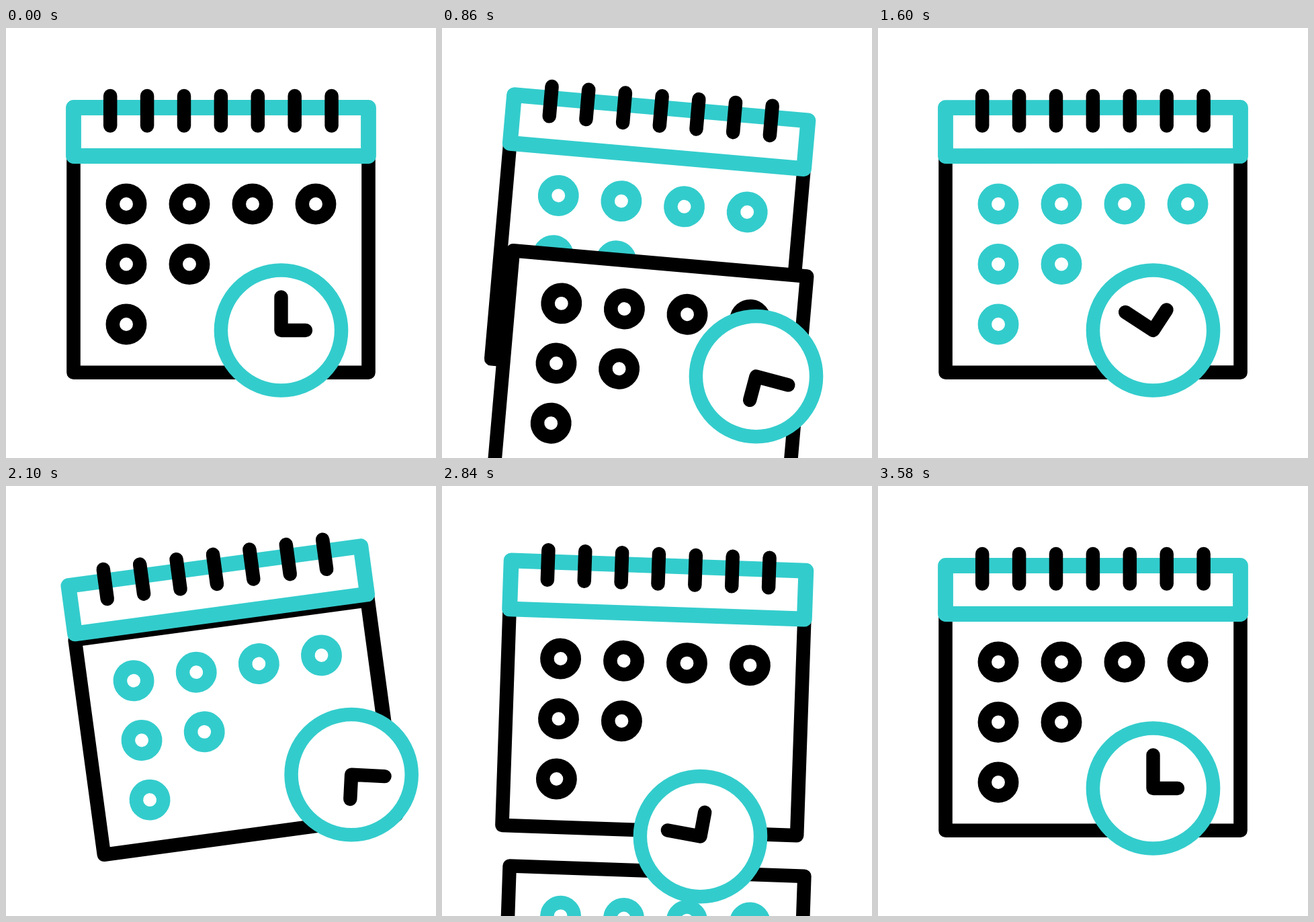
Write an HTML page with a canvas that moves like this. It is 640 by 640 pixels and loops after 3.6 s.

```html
<!DOCTYPE html>
<html lang="en">
<head>
<meta charset="utf-8">
<title>Calendar and clock</title>
<style>
  html, body { margin: 0; width: 100%; height: 100%; overflow: hidden; background: #fff; }
  canvas { display: block; width: 640px; height: 640px; }
</style>
</head>
<body>
<canvas id="stage" width="640" height="640"></canvas>
<script>
const ctx = document.getElementById('stage').getContext('2d');
const TEAL = '#33cccc', BLACK = '#000', WHITE = '#fff';
const LOOP = 3600, CYCLE = 1594, SPIN = 3580;
const PIVOT = { x: 320, y: 190 };
const DEG = Math.PI / 180;
const DOTS_PER_ROW = [4, 2, 1];

// Progress of the clock around its circular path: time, degrees, degrees per ms.
const ORBIT = [
  [0, 0, 0], [420, 53, 0.29], [507, 82, 0.3], [860, 141, 0.1],
  [1080, 168, 0.4], [1246, 278, 0.6], [1560, 360, 0]
];

const clamp = v => Math.min(1, Math.max(0, v));
const ramp = (t, from, to) => clamp((t - from) / (to - from));
const ease = (t, from, to) => {
  const u = ramp(t, from, to);
  return u * u * (3 - 2 * u);
};

function hermite(keys, t) {
  for (let i = 1; i < keys.length; i++) {
    const [t0, a, va] = keys[i - 1], [t1, b, vb] = keys[i];
    if (t > t1) continue;
    const d = t1 - t0, u = (t - t0) / d, w = 1 - u;
    return w * w * ((1 + 2 * u) * a + u * d * va) + u * u * ((1 + 2 * w) * b - w * d * vb);
  }
  return keys[keys.length - 1][1];
}

const swing = t =>
  -10 * ease(t, 0, 395) + 15 * ease(t, 395, 848) - 5 * ease(t, 848, 1550);

function stroke(color, width) {
  ctx.strokeStyle = color;
  ctx.lineWidth = width;
  ctx.stroke();
}

function ring(x, y, radius, color) {
  ctx.beginPath();
  ctx.arc(x, y, radius, 0, 2 * Math.PI);
  ctx.fillStyle = WHITE;
  ctx.fill();
  stroke(color, 20.5);
}

function box(top, height, color, width) {
  ctx.beginPath();
  ctx.rect(100.5, top, 439, height);
  ctx.fillStyle = WHITE;
  ctx.fill();
  stroke(color, width);
}

function rotated(angle, draw) {
  ctx.save();
  ctx.translate(PIVOT.x, PIVOT.y);
  ctx.rotate(angle * DEG);
  ctx.translate(-PIVOT.x, -PIVOT.y);
  draw();
  ctx.restore();
}

function sheet(angle, dotColor, dx = 0, dy = 0) {
  ctx.save();
  ctx.translate(dx, dy);
  rotated(angle, () => {
    box(190, 322.7, BLACK, 20.6);
    DOTS_PER_ROW.forEach((count, row) => {
      for (let i = 0; i < count; i++) ring(179 + 94 * i, 262 + 89.5 * row, 20.2, dotColor);
    });
  });
  ctx.restore();
}

function header(loopArc) {
  box(118.5, 72, TEAL, 22.8);
  if (loopArc > 0) {
    ctx.beginPath();
    ctx.arc(415.5, 187.5, 149, -29 * DEG, (-29 - 87 * loopArc) * DEG, true);
    stroke(TEAL, 20.5);
  }
  ctx.beginPath();
  for (let i = 0; i < 7; i++) {
    const x = 155.2 + 54.9 * i;
    ctx.moveTo(x, 101);
    ctx.lineTo(x, 145.5);
  }
  stroke(BLACK, 20.5);
}

function clock(t, angle, spin) {
  const a = (hermite(ORBIT, t) - 128.2) * DEG;
  const start = -128.2 * DEG;
  const vx = 89.5 + 54 * (Math.cos(a) - Math.cos(start));
  const vy = 260 + 54 * (Math.sin(a) - Math.sin(start));
  const c = Math.cos(angle * DEG), s = Math.sin(angle * DEG);
  ctx.save();
  ctx.translate(PIVOT.x + vx * c - vy * s, PIVOT.y + vx * s + vy * c);
  ring(0, 0, 89.6, TEAL);
  ctx.rotate(spin * DEG);
  ctx.beginPath();
  ctx.moveTo(0, -49.5);
  ctx.lineTo(0, 0);
  ctx.lineTo(36.5, 0);
  stroke(BLACK, 20.4);
  ctx.restore();
}

function render(time) {
  const second = time >= CYCLE;
  const t = second ? time - CYCLE : time;
  const angle = swing(t);
  const [front, back] = second ? [TEAL, BLACK] : [BLACK, TEAL];
  const fall = ease(t, 410, 1550);
  const arc = second ? 0 : Math.min(ramp(t, 240, 420), 1 - ramp(t, 420, 600));

  ctx.fillStyle = WHITE;
  ctx.fillRect(0, 0, 640, 640);
  ctx.lineCap = ctx.lineJoin = 'round';

  if (fall > 0) sheet(angle, back);
  if (fall < 1) sheet(angle, front, 4.5 * Math.sin(Math.PI * ramp(t, 500, 1240)), 464 * fall);
  rotated(angle, () => header(arc));
  clock(t, angle, 720 * ease(time, 0, SPIN));
}

function frame() {
  render(performance.now() % LOOP);
  requestAnimationFrame(frame);
}
frame();
</script>
</body>
</html>
```
